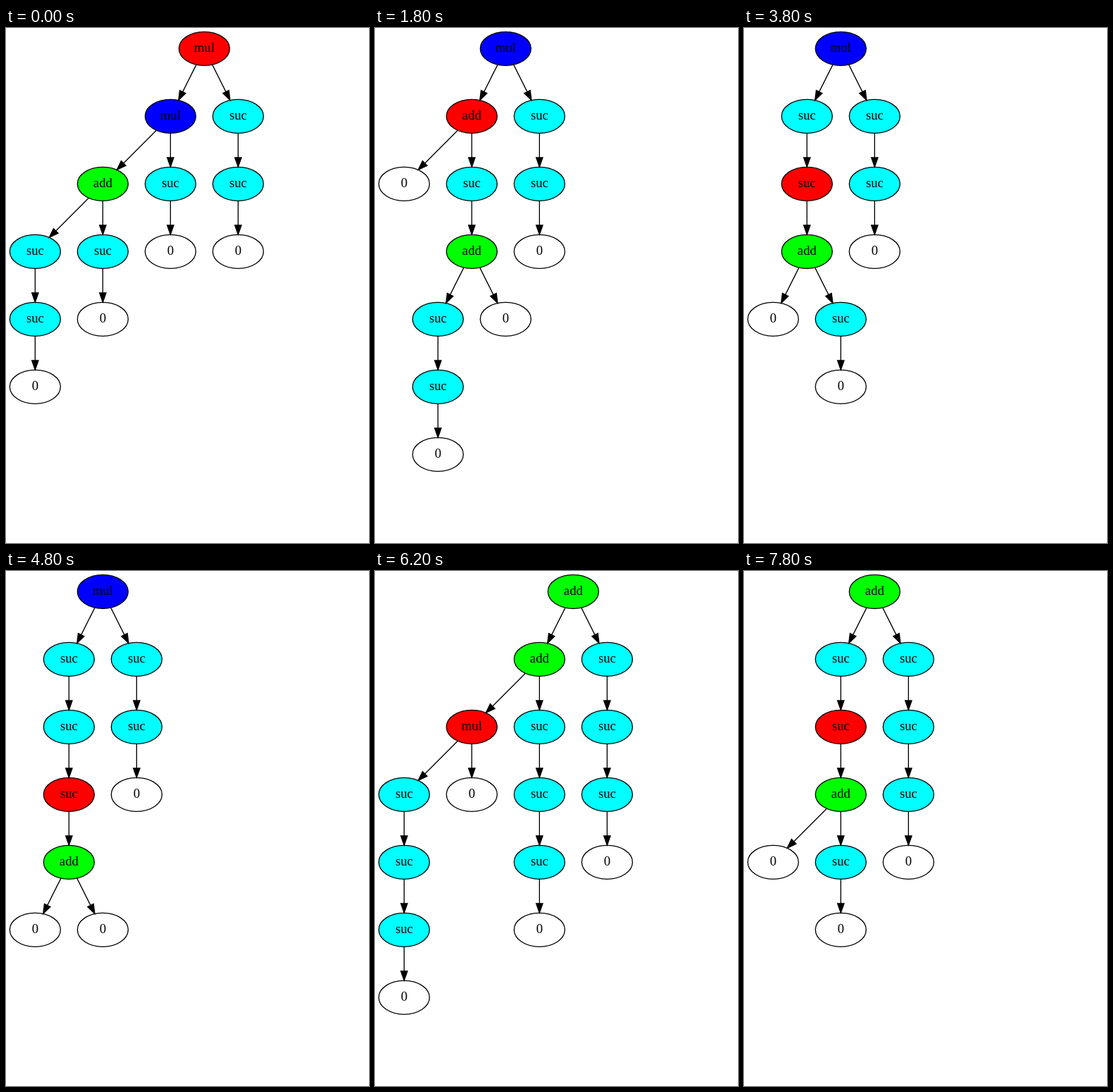
An HTML page with a canvas for the animation above (8000 ms loop, 515 by 731 pixels).

```html
<!DOCTYPE html>
<html>
<head>
<meta charset="utf-8">
<title>Term rewriting</title>
<style>
  html, body { margin: 0; width: 100%; height: 100%; overflow: hidden; background: #fff; }
  canvas { display: block; }
</style>
</head>
<body>
<canvas id="stage" width="515" height="731"></canvas>
<script>
const ctx = document.getElementById('stage').getContext('2d');
const FRAME_MS = 200, LOOP_MS = 8000;
const RX = 36, RY = 24, UNIT = 24, RANK = 96, ORIGIN_X = 124 / 3, ORIGIN_Y = 88 / 3;
const ARROW_LENGTH = 40 / 3, ARROW_HALF = 14 / 3;
const COLORS = { mul: '#00f', add: '#0f0', suc: '#0ff', 0: '#fff' };

// Terms are arrays: [operator, ...arguments]
const zero = ['0'];
const suc = x => ['suc', x];
const add = (x, y) => ['add', x, y];
const mul = (x, y) => ['mul', x, y];
const number = n => n ? suc(number(n - 1)) : zero;

function reduce([op, x, y]) {
  if (y === zero) return op === 'add' ? x : zero;
  return op === 'add' ? suc(add(x, y[1])) : add(mul(x, y[1]), x);
}

function rewriteAt(term, path) {
  if (!path) return reduce(term);
  const copy = [...term];
  copy[path[0]] = rewriteAt(term[path[0]], path.slice(1));
  return copy;
}

// Path to the redex, then the column of each left child in preorder.
// A right child sits 4 columns further unless a pair is given.
const steps = [
  ['1', [8, 4, 0]],
  ['12', [[12, 18], [6, 12], 2, 0, 10]],
  ['11', [11, 7, 3, 0, 9]],
  ['1', [4, 0, 2]],
  ['112', [4, 0, 2]],
  ['11', [4, 0]],
  ['111', [2, 0]],
  ['1111', [2, 0]],
  ['', [0]],
  ['1', [4, 0]],
  ['11', [8, 4, 0]],
  ['1', [4, 0]],
  ['11', [4, 0]],
  ['111', [4, 0]]
];

function layout(term, columns) {
  const pairs = columns.map(c => Array.isArray(c) ? c : [c, c + 4]);
  const [left, right] = pairs[0];
  const place = ([op, ...args], column, rank, path) => {
    const xs = args.length === 2 ? pairs.shift() : [column];
    return {
      op, path,
      x: ORIGIN_X + column * UNIT,
      y: ORIGIN_Y + rank * RANK,
      children: args.map((arg, i) => place(arg, xs[i], rank + 1, path + (i + 1)))
    };
  };
  return place(term, (left + right) / 2, 0, '');
}

// Each step walks the red marker from the root down to the redex.
// The loop ends during the last walk.
const frames = [];
let term = mul(mul(add(number(2), number(1)), number(1)), number(2));
for (const [path, columns] of steps) {
  const tree = layout(term, columns);
  for (let depth = 0; depth <= path.length; depth++) {
    frames.push({ tree, active: path.slice(0, depth) });
  }
  term = rewriteAt(term, path);
}

function drawEdge(from, to) {
  const dx = to.x - from.x, dy = to.y - from.y;
  const reach = 1 / Math.hypot(dx / RX, dy / RY);
  const length = Math.hypot(dx, dy), ux = dx / length, uy = dy / length;
  const tipX = to.x - dx * reach, tipY = to.y - dy * reach;
  const baseX = tipX - ux * ARROW_LENGTH, baseY = tipY - uy * ARROW_LENGTH;
  ctx.fillStyle = '#000';
  ctx.beginPath();
  ctx.moveTo(from.x + dx * reach, from.y + dy * reach);
  ctx.lineTo(baseX, baseY);
  ctx.stroke();
  ctx.beginPath();
  ctx.moveTo(tipX, tipY);
  ctx.lineTo(baseX - uy * ARROW_HALF, baseY + ux * ARROW_HALF);
  ctx.lineTo(baseX + uy * ARROW_HALF, baseY - ux * ARROW_HALF);
  ctx.closePath();
  ctx.fill();
  ctx.stroke();
}

function drawNode(node, active) {
  ctx.beginPath();
  ctx.ellipse(node.x, node.y, RX, RY, 0, 0, 2 * Math.PI);
  ctx.fillStyle = node.path === active ? '#f00' : COLORS[node.op];
  ctx.fill();
  ctx.stroke();
  ctx.fillStyle = '#000';
  ctx.fillText(node.op, node.x, Math.round(node.y) + 5);
  for (const child of node.children) {
    drawNode(child, active);
    drawEdge(node, child);
  }
}

function render() {
  const { tree, active } = frames[Math.floor(performance.now() % LOOP_MS / FRAME_MS)];
  ctx.fillStyle = '#fff';
  ctx.fillRect(0, 0, 515, 731);
  ctx.strokeStyle = '#000';
  ctx.lineWidth = 4 / 3;
  ctx.font = '18.67px "Liberation Serif", serif';
  ctx.textAlign = 'center';
  drawNode(tree, active);
  requestAnimationFrame(render);
}
render();
</script>
</body>
</html>
```
